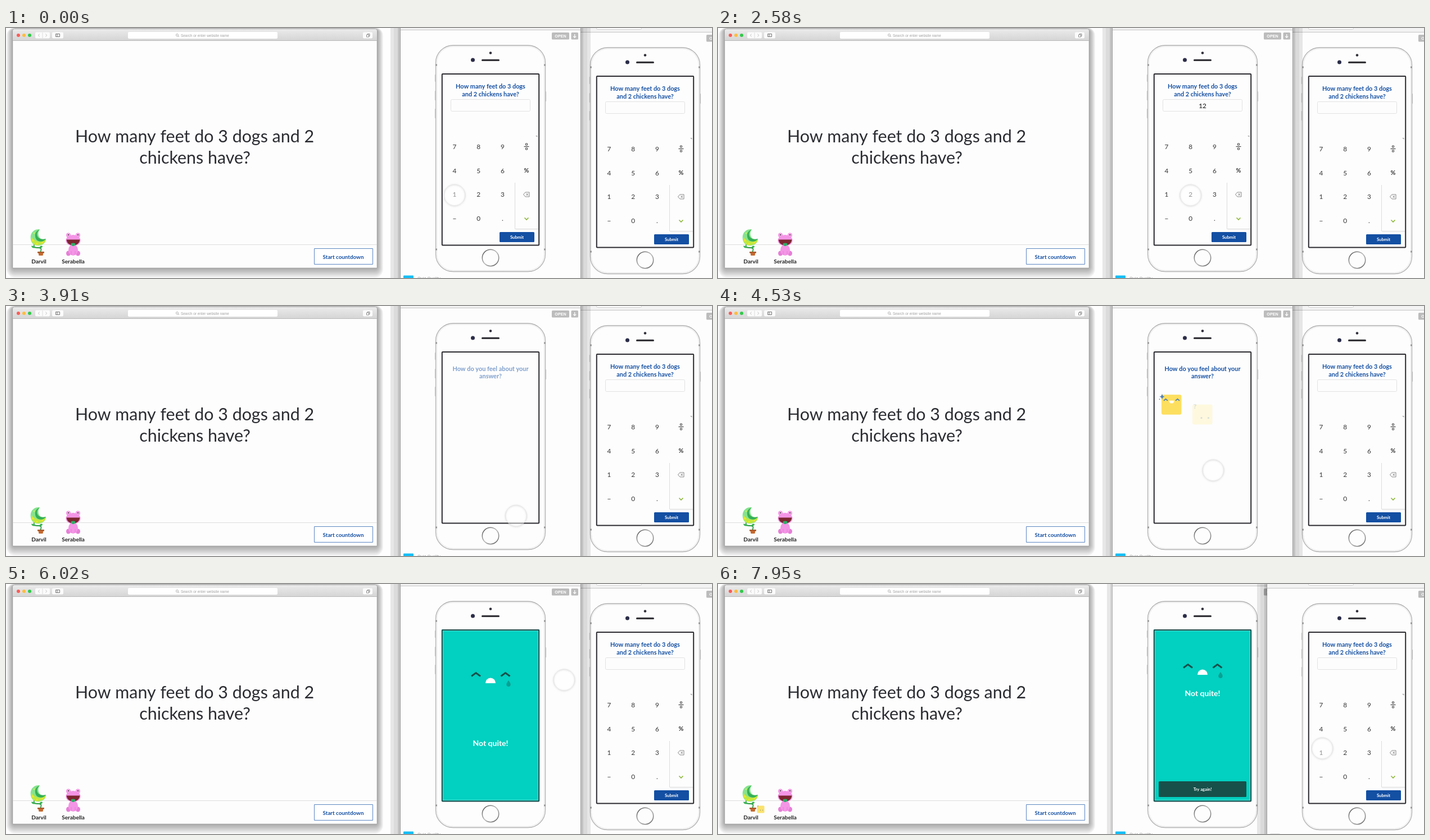
An HTML page with a canvas for the animation above (8 s loop, 1256 by 446 pixels).

```html
<!DOCTYPE html>
<html lang="en">
<head>
<meta charset="utf-8">
<title>Classroom quiz</title>
<style>
  html, body { margin: 0; width: 100%; height: 100%; overflow: hidden; background: #fefefe; }
  canvas { display: block; }
</style>
</head>
<body>
<canvas id="stage" width="1256" height="446"></canvas>
<script>
const ctx = document.getElementById('stage').getContext('2d');
const LOOP = 8000, STEP = 149, PHASE = 1680;
const BLUE = '#134fa3', TEAL = '#02d0c0', DARK_TEAL = '#17504a', YELLOW = '#fddc4f';
const PAPER = '#fdfdfd', ICON_BLUE = '#3a74bd';

const TYPE_ONE = 1230, TYPE_TWO = 2420, FEELING = 3750, RESULT = 5560, FOCUS = 7040;

// time, x, y of the touch pointer
const POINTER = [
  [750, 798, 298], [1100, 798, 299], [1690, 803, 289], [1840, 804, 289],
  [2300, 840, 302], [2700, 841, 297], [2880, 843, 300], [3170, 870, 350],
  [3320, 904, 390], [3600, 908, 375], [4060, 906, 372], [4240, 905, 368],
  [4511, 881, 293], [5000, 868, 195], [5256, 866, 181], [5700, 866, 178],
  [6001, 993, 171], [6310, 1112, 200], [6480, 1114, 235], [6900, 1100, 268],
  [7500, 1079, 288], [7938, 1075, 293]
];

const clamp = v => Math.max(0, Math.min(1, v));
const mix = (a, b, p) => a + (b - a) * p;
const progress = (t, start, length) => clamp((t - start) / length);
const smooth = p => p * p * (3 - 2 * p);

function box(x, y, w, h, r, fill, stroke, width = 1) {
  ctx.beginPath();
  ctx.roundRect(x, y, w, h, r);
  paint(fill, stroke, width);
}

function paint(fill, stroke, width = 1) {
  if (fill) { ctx.fillStyle = fill; ctx.fill(); }
  if (stroke) { ctx.strokeStyle = stroke; ctx.lineWidth = width; ctx.stroke(); }
}

function disc(x, y, r, fill, stroke, width) {
  oval(x, y, r, r, fill, stroke, width);
}

function oval(x, y, rx, ry, fill, stroke, width, from = 0, to = Math.PI * 2) {
  ctx.beginPath();
  ctx.ellipse(x, y, rx, ry, 0, from, to);
  paint(fill, stroke, width);
}

function line(points, color, width = 1) {
  ctx.beginPath();
  for (let i = 0; i < points.length; i += 2) ctx.lineTo(points[i], points[i + 1]);
  paint(null, color, width);
}

function shape(path, fill, stroke, width = 1) {
  const p = new Path2D(path);
  if (fill) { ctx.fillStyle = fill; ctx.fill(p); }
  if (stroke) { ctx.strokeStyle = stroke; ctx.lineWidth = width; ctx.stroke(p); }
}

// y is the middle of the capitals
function text(str, x, y, size, color, weight = 700, family = 'Lato', align = 'center') {
  ctx.font = `${weight} ${size}px ${family}, sans-serif`;
  ctx.textAlign = align;
  ctx.fillStyle = color;
  ctx.fillText(str, x, y + size * 0.36);
}

function at(x, y, alpha, draw) {
  ctx.save();
  ctx.translate(x, y);
  ctx.globalAlpha *= alpha;
  draw();
  ctx.restore();
}

function shadowBands(x, y, w, h, bands) {
  for (const [spread, alpha] of bands) {
    box(x - spread, y - spread, w + spread * 2, h + spread * 2, spread + 4, `rgba(0,0,0,${alpha})`);
  }
}

function drawBrowser(t) {
  for (let s = 11; s > 0; s--) {
    box(12 - s, 2 - s * .3, 648 + s * 2, 426 + s * 1.9, s + 4, 'rgba(0,0,0,.035)');
  }
  box(12, 2, 648, 426, [4, 4, 0, 0], PAPER, 'rgba(120,120,120,.35)');
  const bar = ctx.createLinearGradient(0, 2, 0, 23);
  bar.addColorStop(0, '#ebebeb');
  bar.addColorStop(1, '#d4d4d4');
  box(12, 2, 648, 21, [4, 4, 0, 0], bar);
  line([12, 22.5, 660, 22.5], '#b9b9b9');
  ['#fc5b57', '#fdbc40', '#34c84a'].forEach((c, i) => disc(22 + i * 10, 13, 3, c));

  box(52, 7.5, 26, 11, 2, '#fbfbfb');
  line([65, 8, 65, 18], '#ddd');
  line([59.5, 10.5, 57.5, 13, 59.5, 15.5], '#c4c4c4');
  line([70.5, 10.5, 72.5, 13, 70.5, 15.5], '#c4c4c4');
  box(82, 7.5, 20, 11, 2, '#fbfbfb');
  box(88.5, 10.5, 7, 5, 0, null, '#777');
  line([91, 10.5, 91, 15.5], '#777');
  box(217, 7, 266, 12, 2, '#fff');
  disc(304.5, 12.6, 2, null, '#999', .8);
  line([306, 14.1, 308, 16], '#999', .8);
  text('Search or enter website name', 311, 13.2, 6.45, '#a2a2a2', 400, 'Liberation Sans', 'left');
  box(635, 7.5, 17, 11, 2, '#fbfbfb');
  box(641.5, 12, 4, 4, 0, null, '#777', .8);
  line([643, 12, 643, 10.5, 647, 10.5, 647, 14.5, 645.5, 14.5], '#777', .8);

  text('How many feet do 3 dogs and 2', 335.5, 193.5, 30.4, '#2b2c32', 400);
  text('chickens have?', 336, 231.5, 30.4, '#2b2c32', 400);

  line([12, 386.5, 660, 386.5], '#dedede');
  drawPlant();
  drawFrog();
  text('Darvil', 58.5, 416, 10, '#222');
  text('Serabella', 119.5, 416, 10, '#222');
  box(548.5, 393.5, 104, 28, 0, '#fff', '#5c87c2');
  text('Start countdown', 600, 408, 9.8, BLUE);

  const rise = smooth(progress(t, 6140, 400));
  if (rise > 0) {
    ctx.save();
    ctx.beginPath();
    ctx.rect(60, 380, 40, 48);
    ctx.clip();
    at(69.5, mix(428, 395.5, rise), 1, () => {
      box(0, 0, 13, 13, 1.5, '#fbe26c');
      disc(6, 8, .7, '#89907a');
      disc(10, 8, .7, '#89907a');
      text('?', 1.5, 1.5, 4, ICON_BLUE);
    });
    ctx.restore();
  }
}

function drawPlant() {
  shape('M51 385 C47 392 53 392 58 392 C64 392 63 396 61 400', null, '#2a9a42', 1.8);
  shape('M52 392 Q47 387 45 389 Q47 394 52 392Z', '#35b34f');
  shape('M59 392 Q61 387 65 389 Q65 393 59 392Z', '#35b34f');
  shape('M60 359 C42 358 40 378 49 386 C58 391 71 387 71 376 C63 381 53 371 60 359Z', '#86e38c');
  shape('M45 373 C44 382 50 388 56 387.5 C64 387 71 383 71 376 C62 385 52 381 45 373Z', '#c3e83e');
  shape('M60 360 C51 366 55 380 71 376 C66 384 53 382 52 372 C51 365 55 361 60 360Z', '#35b055');
  disc(48, 379, 1.7, '#f2e52e');
  disc(55, 385, 1.6, '#f2e52e');
  disc(65, 383, 1.5, '#f2e52e');
  disc(50, 366, 1.3, '#cbf15a');
  box(56, 399, 12, 2.4, .5, '#a5582a');
  shape('M57.5 401 H66.5 L65.5 406 H58.5Z', '#c4692f');
}

function drawFrog() {
  const pink = '#f495e6', deep = '#e57fd6';
  oval(111, 402, 4, 4.5, deep);
  oval(128, 402, 4, 4.5, deep);
  oval(119.5, 396, 8.5, 10, pink);
  line([116, 398, 116, 405], deep);
  line([123, 398, 123, 405], deep);
  oval(119.5, 379, 13, 10, pink);
  for (const x of [111, 128]) {
    disc(x, 369.5, 4, pink);
    disc(x, 369, 2, '#fbd5f5');
    disc(x, 369, 1.2, '#6b3a63');
  }
  shape('M107.5 377.5 H131.5 Q130 387.5 119.5 387.5 Q109 387.5 107.5 377.5Z', '#7c2630');
  oval(119.5, 385.7, 4, 2.2, '#2fae68');
  box(117, 386, 5, 3, 1.5, '#2fae68');
}

function drawWindow(active, drawScreen) {
  const bands = active ? [[18, .09], [12, .05], [5, .11], [1, .2]] : [[10, .09], [4, .09], [1, .16]];
  shadowBands(702, -24, 320, 500, bands);
  ctx.fillStyle = PAPER;
  ctx.fillRect(702, -24, 320, 500);
  ctx.fillStyle = '#f3f3f3';
  ctx.fillRect(702, -24, 320, 27);
  line([702, 3.5, 1022, 3.5], '#c4c4c4');
  box(775.5, -12.5, 80, 11, 2, '#fff', '#cfcfcf');

  box(971, 8, 31, 12.5, 1.5, '#bcbcbc');
  text('OPEN', 986.5, 14.3, 7.2, '#fff', 700, 'Liberation Sans');
  box(1005.5, 8, 12.5, 12.5, 1.5, '#bcbcbc');
  line([1011.7, 11, 1011.7, 17], '#fff', 1.3);
  line([1009.2, 14.6, 1011.7, 17.2, 1014.2, 14.6], '#fff', 1.3);

  box(707, 441.5, 18, 18, 1, drawScreen === leftScreen ? '#14bdf5' : '#bbb');
  text('Quiz Quality', 732, 446.5, 7.5, '#999', 400, 'Liberation Sans', 'left');

  drawPhone();
  drawScreen();
}

function drawPhone() {
  for (const y of [83, 112, 144]) box(762.8, y, 2, y === 83 ? 13 : 17, 1, '#d0d0d0');
  box(959.2, 113, 2, 18, 1, '#d0d0d0');
  box(764.5, 31, 195, 403.5, 31, PAPER, '#b0b0b0', 1.3);
  box(766.5, 33, 191, 399.5, 29, null, '#e6e6e6');
  for (const y of [66, 395]) {
    line([764, y, 767, y], '#999', 3);
    line([957, y, 960, y], '#999', 3);
  }
  disc(862, 44.5, 2.3, '#30303a');
  disc(830.5, 57, 3.5, '#2b2d49');
  box(846, 55.8, 32, 3.2, 1.6, '#333338');
  const ring = ctx.createLinearGradient(847, 395, 877, 425);
  ring.addColorStop(0, '#444');
  ring.addColorStop(.5, '#bbb');
  ring.addColorStop(1, '#555');
  disc(862, 410, 14.7, PAPER, ring, 1.5);
}

function drawKeypad(answer) {
  text('How many feet do 3 dogs', 862, 104.5, 10.9, BLUE);
  text('and 2 chickens have?', 862, 118, 10.9, BLUE);
  box(791.5, 127.5, 141, 21, 2, PAPER, '#e2e2e2');
  if (answer) text(answer, 862, 138.3, 11.8, '#222', 500);
  shape('M942 192 L945.5 192 L945.5 195Z', '#aaa');

  ['789', '456', '123', '−0.'].forEach((row, r) => {
    [...row].forEach((key, c) => text(key, 798 + c * 42.7, 211.5 + r * 42.8, 11.8, '#444', 500));
  });
  line([921.5, 211.5, 930.5, 211.5], '#444', 1.2);
  for (const y of [206, 214]) box(924.5, y, 3, 3, 0, null, '#444');
  text('%', 926, 254.5, 10.8, '#333');

  line([905.5, 276, 905.5, 358.5, 947, 358.5], '#dcdcdc');
  line([907, 360, 947, 360], '#f0f0f0');
  shape('M920.5 297 L924 293 H931 V301 H924Z', null, '#888');
  line([925.5, 295, 929, 299], '#888');
  line([929, 295, 925.5, 299], '#888');
  line([922.5, 338.5, 926, 342, 929.5, 338.5], '#8db63c', 1.6);
  box(878, 364, 62, 18, 1.5, BLUE);
  text('Submit', 909, 373, 7.7, '#fff');
}

function drawFeeling(t) {
  text('How do you feel about your', 862, 111.8, 10.9, BLUE);
  text('answer?', 862, 125, 10.9, BLUE);
  [[789, 4060, happyFace], [844, 4420, unsureFace], [899.5, 4910, sleepyFace]].forEach(([x, start, face]) => {
    const p = progress(t, start, 500);
    if (p > 0) at(x, 156 + 24 * (1 - p), p, () => { box(0, 0, 35.5, 35.5, 3, YELLOW); face(); });
  });
}

function happyFace() {
  shape('M1 -2 Q1.5 3 6 3.5 Q1.5 4 1 9 Q.5 4 -4 3.5 Q.5 3 1 -2Z', ICON_BLUE);
  disc(-3.5, 8, .9, ICON_BLUE);
  line([4, 10.5, 7.5, 7.5, 11, 10.5], ICON_BLUE, 1.8);
  line([25, 10.5, 28.5, 7.5, 32, 10.5], ICON_BLUE, 1.8);
  oval(18, 10.5, 4.7, 5, '#fff', null, 1, 0, Math.PI);
}

function unsureFace() {
  text('?', 4.5, 3.5, 12, ICON_BLUE, 900);
  disc(16, 24, 1.7, ICON_BLUE);
  disc(28.5, 24, 1.7, ICON_BLUE);
  line([20.5, 28, 24, 28], '#fff', 1.5);
}

function sleepyFace() {
  oval(10, 16, 4, 3.5, null, ICON_BLUE, 1.5, 0, Math.PI);
  oval(24.5, 16, 4, 3.5, null, ICON_BLUE, 1.5, 0, Math.PI);
  oval(17.5, 25, 2.5, 2, '#fff');
  text('z', 28, 6, 7, ICON_BLUE);
  text('z', 32, 3.5, 8, ICON_BLUE);
  text('Z', 36.5, 1, 8, ICON_BLUE);
}

function drawResult(t) {
  ctx.fillStyle = TEAL;
  ctx.fillRect(775, 81, 174, 307);
  box(777.5, 83.5, 169, 302, 0, null, '#4fe0d3');
  const lift = smooth(progress(t, 6001, 520));
  at(0, -15 * lift, 1, () => {
    for (const x of [836, 888.5]) line([x - 8, 164.5, x, 158.5, x + 8, 164.5], DARK_TEAL, 3);
    oval(862, 177, 9, 9.5, '#fff', null, 1, Math.PI, Math.PI * 2);
    shape('M894 172 Q898 177.5 897.7 179.3 A3.7 3.7 0 0 1 890.3 179.3 Q890 177.5 894 172Z', '#08a093');
  });
  const y = mix(284, 195, lift) + 50 * (1 - progress(t, 5700, 300));
  at(0, 0, progress(t, 5650, 300), () => text('Not quite!', 862, y, 14, '#fff'));
  at(0, 0, progress(t, 6400, 400), () => {
    box(784, 352, 156, 28, 1.5, DARK_TEAL);
    text('Try again!', 862, 366, 7.6, '#fff');
  });
}

function frameScreen(color) {
  box(775.8, 82, 172.4, 305.5, 1, null, color, 2);
}

let now = 0;

function leftScreen() {
  if (now < FEELING) drawKeypad(now >= TYPE_TWO ? '12' : now >= TYPE_ONE ? '1' : '');
  else at(0, 0, progress(now, FEELING - 120, 250), () => drawFeeling(now));
  const teal = progress(now, RESULT - 75, 225);
  if (teal > 0) at(0, 0, teal, () => drawResult(now));
  frameScreen(teal > .5 ? '#1c4b4a' : '#2b2b30');
}

function rightScreen() {
  drawKeypad('');
  frameScreen('#2b2b30');
}

function drawPointer(t) {
  let i = POINTER.findIndex(p => p[0] > t);
  if (i < 0) i = POINTER.length;
  const a = POINTER[Math.max(0, i - 1)], b = POINTER[Math.min(i, POINTER.length - 1)];
  const p = b[0] > a[0] ? smooth(progress(t, a[0], b[0] - a[0])) : 0;
  const x = mix(a[1], b[1], p), y = mix(a[2], b[2], p);
  ctx.save();
  disc(x, y, 19, 'rgba(255,255,255,.45)');
  ctx.shadowColor = 'rgba(0,0,0,.3)';
  ctx.shadowBlur = 2.5;
  ctx.shadowOffsetY = .8;
  disc(x, y, 19, null, 'rgba(225,225,225,.85)', .8);
  ctx.restore();
}

function draw(clock) {
  const t = clock % LOOP;
  now = t < 750 ? 0 : Math.max(750, PHASE + STEP * Math.floor((t - PHASE) / STEP));
  ctx.fillStyle = '#fefefe';
  ctx.fillRect(0, 0, 1256, 446);
  drawBrowser(now);
  const swapped = now >= FOCUS;
  const left = () => drawWindow(!swapped, leftScreen);
  const right = () => at(275, 4, 1, () => drawWindow(swapped, rightScreen));
  (swapped ? [left, right] : [right, left]).forEach(f => f());
  drawPointer(now);
}

const begin = performance.now();
function tick() {
  draw(performance.now() - begin);
  requestAnimationFrame(tick);
}
tick();
</script>
</body>
</html>
```
